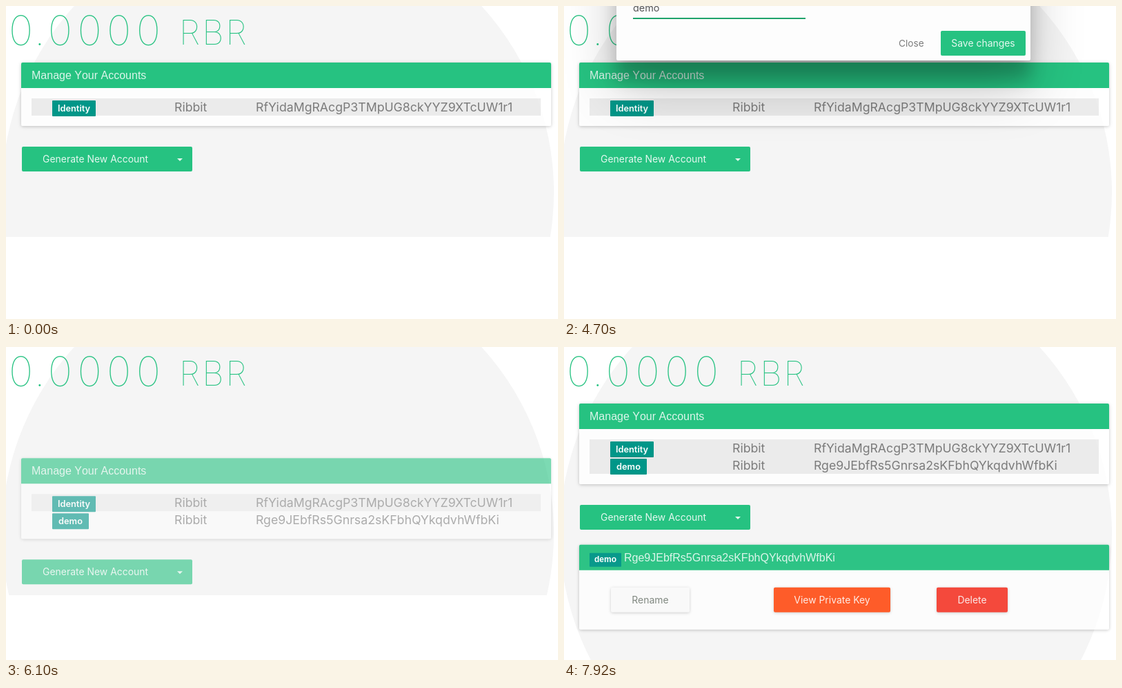
Recreate the animation shown at these times as an HTML page. Size 800 px wide and 454 px high, loop 7.99 s.

```html
<!DOCTYPE html>
<html lang="en">
<head>
<meta charset="utf-8">
<title>Manage Your Accounts</title>
<style>
html, body { margin: 0; width: 100%; height: 100%; overflow: hidden; background: #fff; }
body { position: relative; font: 13.65px Inter, sans-serif; color: #7b7b7b; white-space: nowrap; }
.abs, .row > *, .btn { position: absolute; }
#page { left: 0; top: 0; width: 800px; overflow: hidden; }
#disc { left: -6px; top: -130px; width: 800px; height: 800px; border-radius: 50%; background: #f5f5f5; }

.balance { color: #26c281; font-weight: 100; line-height: 60px; }
#amount { left: 4px; top: 4.5px; font-size: 59.5px; letter-spacing: 7.5px; }
#amount span { margin-left: -6px; letter-spacing: 4px; }
#unit { left: 251px; top: 8.5px; font-size: 49px; letter-spacing: 3px; }

.view { position: absolute; left: 22px; width: 768px; }
#accounts { top: 82px; padding-bottom: 52px; }
#details { top: 282px; padding-bottom: 20px; }
.card { border-radius: 2px; background: rgba(255,255,255,.75); box-shadow: 0 1px 6px rgba(0,0,0,.12), 0 1px 4px rgba(0,0,0,.12); }
.head { height: 37px; padding-left: 15px; border-radius: 2px 2px 0 0; background: #26c281;
  color: rgba(255,255,255,.84); font: 16px/37px "Liberation Sans", Arial, sans-serif; font-kerning: none; }
.rows { padding: 15px; margin-bottom: 30px; }
.row { position: relative; height: 25px; font-size: 17.7px; line-height: 25px; }
.row.shade { background: rgba(0,0,0,.07); }
.row .coin { left: 207px; }
.row .key { left: 325px; }
.badge { background: #009688; color: #fff; border-radius: 1px; text-align: center; }
.row .badge { left: 30px; top: 3px; height: 23px; font-size: 12.8px; font-weight: 600; line-height: 23px; }
.head .badge { display: inline-block; position: relative; top: -3px; width: 46px; height: 20px; margin-right: 4px; vertical-align: -4px;
  font: bold 12px/19px "Liberation Sans", Arial, sans-serif; }
.btn { height: 36px; line-height: 36px; border-radius: 2px; background: #26c281; color: rgba(255,255,255,.88);
  font-size: 13.95px; text-align: center; }
#generate { left: 1px; bottom: 16px; width: 217px; padding-left: 30px; text-align: left; }
#generate::after { content: ""; position: absolute; left: 225px; top: 17px; border: 4px solid transparent; border-top-color: #dff6ec; }
#actions { height: 86px; }
#actions .btn { top: 62px; box-shadow: 0 1px 4px rgba(0,0,0,.2); }

#menu { left: 23px; top: 247px; width: 160px; height: 83px; border-radius: 2px; background: #fdfdfd; box-shadow: 0 1px 4px rgba(0,0,0,.35); }
#menu div { height: 26px; line-height: 26px; padding-left: 20px; }
#menu .hover { background: #ebebeb; }

#modal { left: 76px; top: -221px; width: 600px; height: 300px; border-radius: 2px; background: #fdfdfd;
  box-shadow: 0 27px 24px rgba(0,0,0,.2), 0 40px 77px rgba(0,0,0,.22); }
#field { left: 24px; top: 214px; line-height: 20px; font-size: 14.4px; color: #555; }
#hint { left: 0; top: 0; font-size: 13.5px; color: #b9b9b9; }
#caret { display: inline-block; width: 1px; height: 18px; vertical-align: middle; background: #222; }
#rule { left: 24px; top: 239px; width: 250px; height: 1px; background: #ccc; }
#focus { left: 0; top: -1px; width: 250px; height: 2px; background: #1fa36b; }
#close { left: 409px; top: 257px; line-height: 36px; }
#save { left: 470px; top: 257px; width: 123px; }
</style>
</head>
<body>
<div id="page" class="abs"><div id="disc" class="abs"></div></div>
<div id="amount" class="abs balance">0<span>.</span>0000</div>
<div id="unit" class="abs balance">RBR</div>

<div id="accounts" class="view">
  <div class="card">
    <div class="head">Manage Your Accounts</div>
    <div class="rows">
      <div class="row shade">
        <span class="badge" style="width:63px">Identity</span><span class="coin">Ribbit</span>
        <span class="key">RfYidaMgRAcgP3TMpUG8ckYYZ9XTcUW1r1</span>
      </div>
      <div class="row" id="added">
        <span class="badge" style="width:53px">demo</span><span class="coin">Ribbit</span>
        <span class="key">Rge9JEbfRs5Gnrsa2sKFbhQYkqdvhWfbKi</span>
      </div>
    </div>
  </div>
  <div id="generate" class="btn">Generate New Account</div>
</div>

<div id="details" class="view">
  <div class="card">
    <div class="head"><span class="badge">demo</span>Rge9JEbfRs5Gnrsa2sKFbhQYkqdvhWfbKi</div>
    <div id="actions">
      <div class="btn" style="left:46px;width:114px;background:#fafafa;color:#7d857d">Rename</div>
      <div class="btn" style="left:282px;width:169px;background:#ff5722">View Private Key</div>
      <div class="btn" style="left:518px;width:103px;background:#f44336">Delete</div>
    </div>
  </div>
</div>

<div id="menu" class="abs"><div>Ribbit</div><div>Bitcoin</div><div>Franko</div></div>

<div id="modal" class="abs">
  <div id="field" class="abs"><span id="typed"></span><span id="caret"></span><span id="hint" class="abs">Savings Account</span></div>
  <div id="rule" class="abs"><div id="focus" class="abs"></div></div>
  <div id="close" class="abs">Close</div>
  <div id="save" class="btn">Save changes</div>
</div>

<script>
const LOOP = 7990, STEP = 70, SLIDE = 1000;
const LEAVE = 5300, ENTER = 5752, DETAILS = 7153;
const TYPED_AT = [3860, 4000, 4070, 4210];
const $ = id => document.getElementById(id);
const clamp = v => Math.min(1, Math.max(0, v));
const ramp = (t, start, length) => clamp((t - start) / length);

// cubic-bezier(.25, .1, .25, 1)
function ease(x) {
  const curve = (u, a, b) => 3 * u * (1 - u) ** 2 * a + 3 * u * u * (1 - u) * b + u ** 3;
  let low = 0, high = 1;
  for (let i = 0; i < 20; i++) {
    const mid = (low + high) / 2;
    if (curve(mid, .25, .25) < x) low = mid; else high = mid;
  }
  return curve(high, .1, 1);
}

// shift is in heights of the view: 0 at rest, 1 below, -1 above
function slide(view, shift) {
  view.style.transform = `translateY(${shift * 100}%)`;
  view.style.opacity = 1 - Math.abs(shift);
}

function draw(t) {
  const entered = t >= ENTER;
  $('page').style.height = (t >= DETAILS ? 454 : entered ? 360 : 335) + 'px';
  $('added').style.display = entered ? '' : 'none';
  $('added').classList.toggle('shade', t >= 7220);
  slide($('accounts'), entered ? 1 - ease(ramp(t, ENTER, SLIDE)) : -ease(ramp(t, LEAVE, SLIDE)));
  slide($('details'), 1 - ease(ramp(t, DETAILS, SLIDE)));

  $('menu').style.opacity = Math.min(ramp(t, 430, 210), 1 - ramp(t, 1410, 210));
  const hovered = t < 990 ? -1 : t >= 1060 && t < 1270 ? 1 : 0;
  [...$('menu').children].forEach((item, i) => item.classList.toggle('hover', i === hovered));

  const shown = ease(ramp(t, 1550, 490)) - ease(ramp(t, 5120, 300));
  $('modal').style.transform = `translateY(${-110 * (1 - shown)}px)`;
  $('modal').style.opacity = Math.min(ramp(t, 1550, 200), 1 - ramp(t, 5120, 210));
  $('focus').style.transform = `scaleX(${ease(ramp(t, 3040, 330))})`;
  const count = TYPED_AT.filter(at => t >= at).length;
  $('typed').textContent = 'demo'.slice(0, count);
  $('hint').style.display = count ? 'none' : '';
  $('caret').style.visibility = t >= 3090 && t < 4700 ? '' : 'hidden';
  $('save').style.background = t >= 4840 ? '#24b87b' : '';
}

function tick() {
  const t = performance.now() % LOOP;
  draw(Math.max(0, Math.floor((t - 10) / STEP) * STEP + 10));
  requestAnimationFrame(tick);
}
tick();
</script>
</body>
</html>
```
